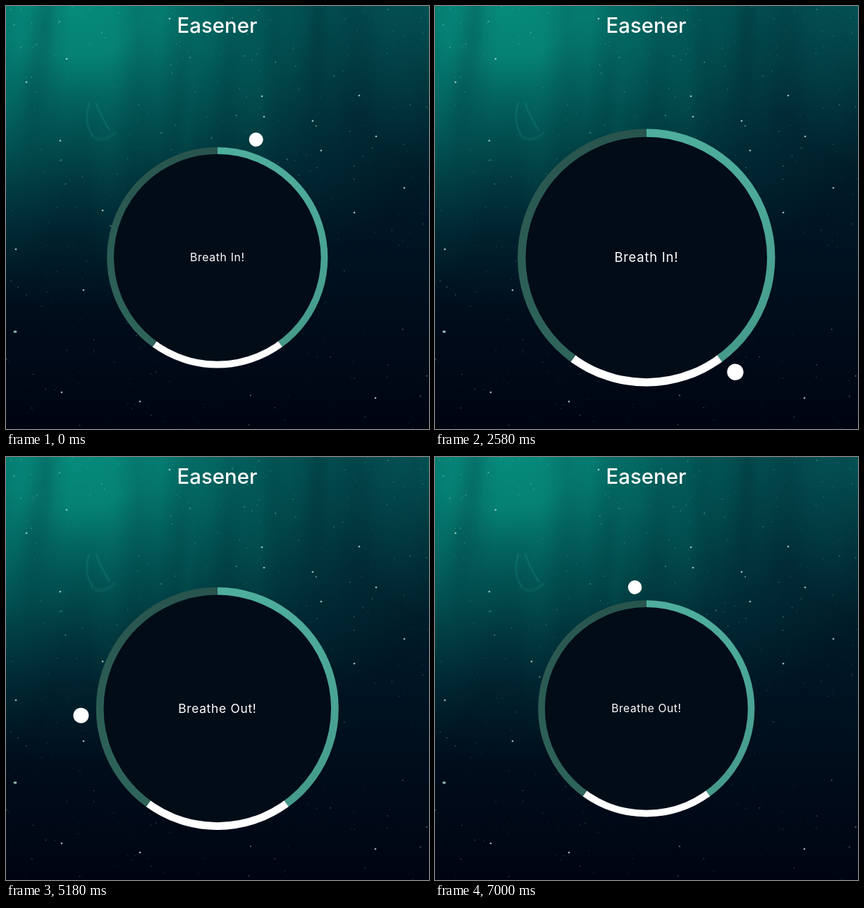
Recreate the animation shown at these times as an HTML page. Size 600 px wide and 600 px high, loop 7.03 s.

```html
<!DOCTYPE html>
<html lang="en">
<head>
<meta charset="utf-8">
<title>Easener</title>
<style>
  html, body { margin: 0; width: 100%; height: 100%; overflow: hidden; background: #000513; }
  svg { display: block; width: 100vw; height: 100vh; }
  text { font-family: Inter, "Open Sans", sans-serif; fill: #fff; text-anchor: middle; }
  #title { font-size: 29.4px; font-weight: 500; }
  #label { font-size: 15.4px; letter-spacing: .04em; }
</style>
</head>
<body>
<svg viewBox="0 0 600 600">
  <defs>
    <linearGradient id="depth" x1="0" y1="0" x2="0" y2="1">
      <stop offset="0" stop-color="#02363e"/>
      <stop offset=".25" stop-color="#01212d"/>
      <stop offset=".5" stop-color="#001524"/>
      <stop offset=".75" stop-color="#000c1a"/>
      <stop offset="1" stop-color="#000411"/>
    </linearGradient>
    <radialGradient id="glow">
      <stop offset="0" stop-color="#068b7b"/>
      <stop offset=".17" stop-color="#068a7a" stop-opacity=".9"/>
      <stop offset=".29" stop-color="#048476" stop-opacity=".68"/>
      <stop offset=".42" stop-color="#028074" stop-opacity=".5"/>
      <stop offset=".58" stop-color="#028074" stop-opacity=".29"/>
      <stop offset=".75" stop-color="#027874" stop-opacity=".14"/>
      <stop offset="1" stop-color="#027874" stop-opacity="0"/>
    </radialGradient>
    <radialGradient id="edgeGlow">
      <stop offset="0" stop-color="#047a72" stop-opacity=".5"/>
      <stop offset=".5" stop-color="#047a72" stop-opacity=".2"/>
      <stop offset="1" stop-color="#047a72" stop-opacity="0"/>
    </radialGradient>
    <radialGradient id="lightRay">
      <stop offset="0" stop-color="#0ca08a" stop-opacity=".07"/>
      <stop offset="1" stop-color="#0ca08a" stop-opacity="0"/>
    </radialGradient>
    <radialGradient id="darkRay">
      <stop offset="0" stop-color="#00202c" stop-opacity=".13"/>
      <stop offset="1" stop-color="#00202c" stop-opacity="0"/>
    </radialGradient>
    <linearGradient id="inhale" x1="0" y1="0" x2="0" y2="1">
      <stop offset="0" stop-color="#4fae9d"/>
      <stop offset="1" stop-color="#459a8a"/>
    </linearGradient>
    <linearGradient id="exhale" x1="0" y1="0" x2="0" y2="1">
      <stop offset="0" stop-color="#28544d"/>
      <stop offset="1" stop-color="#2f655b"/>
    </linearGradient>
  </defs>

  <rect width="600" height="600" fill="url(#depth)"/>
  <ellipse cx="95" cy="0" rx="610" ry="432" fill="url(#glow)"/>
  <ellipse cx="620" cy="-10" rx="170" ry="240" fill="url(#edgeGlow)"/>
  <ellipse cx="-10" cy="90" rx="110" ry="320" fill="url(#edgeGlow)" opacity=".7"/>
  <g id="rays"></g>
  <g fill="none" stroke="#2fa594" stroke-opacity=".16" stroke-linecap="round">
    <path d="M118 138Q110 164 122 182M128 138Q136 160 147 176" stroke-width="3"/>
    <path d="M122 184Q136 196 154 180" stroke-width="5" stroke-opacity=".1"/>
  </g>
  <g id="specks"></g>

  <text id="title" x="299.5" y="38">Easener</text>
  <g id="breather">
    <path id="arcIn" fill="url(#inhale)"/>
    <path id="arcHold" fill="#fff"/>
    <path id="arcOut" fill="url(#exhale)"/>
    <circle r="142.7" fill="#010c17"/>
    <text id="label" y="5.3"></text>
    <circle id="pointer" cy="-171.3" r="9.7" fill="#fff"/>
  </g>
</svg>
<script>
  const LOOP = 7030, TURN = 7490, BREATH = 3000;
  const GROW_START = -435, HOLD_START = 2620, SHRINK_START = 4135;
  const RADIUS = 152.2, GROWTH = 0.2, START_ANGLE = 18.1;

  const $ = id => document.getElementById(id);

  function add(parent, name, attrs) {
    const el = document.createElementNS("http://www.w3.org/2000/svg", name);
    for (const key in attrs) el.setAttribute(key, attrs[key]);
    parent.appendChild(el);
  }

  let seed = 41;
  function random() {
    seed = (seed * 16807) % 2147483647;
    return seed / 2147483647;
  }

  // Wedge of the ring between two fractions of a turn, clockwise from the top.
  function wedge(from, to) {
    const point = f => {
      const a = f * 2 * Math.PI;
      return `${RADIUS * Math.sin(a)} ${-RADIUS * Math.cos(a)}`;
    };
    return `M0 0L${point(from)}A${RADIUS} ${RADIUS} 0 0 1 ${point(to)}Z`;
  }

  function drawWater() {
    for (let i = 0; i < 18; i++) {
      const x = random() * 640 - 20;
      add($("rays"), "ellipse", {
        cx: x, cy: random() * 180, rx: 14 + random() * 26, ry: 130 + random() * 150,
        fill: i % 2 && x < 400 ? "url(#lightRay)" : "url(#darkRay)",
        transform: `rotate(${random() * 6 - 1} ${x} 0)`
      });
    }
    add($("rays"), "ellipse", { cx: 378, cy: 60, rx: 20, ry: 150, fill: "url(#darkRay)" });

    for (let i = 0; i < 620; i++) {
      const y = 600 * random() ** 1.35;
      add($("specks"), "circle", {
        cx: (random() * 600).toFixed(1), cy: y.toFixed(1),
        r: (0.45 + 0.75 * random() ** 3).toFixed(2),
        fill: "#7fc9ba", "fill-opacity": (0.15 + 0.5 * random() ** 2).toFixed(2)
      });
    }
    const bright = [[13, 462], [366, 157], [232, 18], [524, 556], [79, 548], [447, 205],
      [525, 185], [77, 191], [494, 293], [86, 75], [363, 128], [14, 345], [190, 561],
      [137, 290], [565, 258], [29, 108], [435, 163], [501, 127], [110, 403]];
    bright.forEach(([cx, cy], i) => add($("specks"), "ellipse", {
      cx, cy, rx: i ? 1.4 : 2.5, ry: i ? 1.2 : 1.7, fill: "#b5dfd2", "fill-opacity": .8
    }));
  }

  const progress = (t, start) => Math.min(1, Math.max(0, (t - start) / BREATH));

  function render(t) {
    const scale = 1 + GROWTH * (progress(t, GROW_START) - progress(t, SHRINK_START));
    $("breather").setAttribute("transform", `translate(299.8 356.9) scale(${scale})`);
    $("pointer").setAttribute("transform", `rotate(${START_ANGLE + 360 * t / TURN})`);
    const words = t < HOLD_START ? "Breath In!" : t < SHRINK_START ? "Hold" : "Breathe Out!";
    if ($("label").textContent !== words) $("label").textContent = words;
  }

  drawWater();
  $("arcIn").setAttribute("d", wedge(0, 0.4));
  $("arcHold").setAttribute("d", wedge(0.4, 0.6));
  $("arcOut").setAttribute("d", wedge(0.6, 1));

  const start = performance.now();
  function tick() {
    render((performance.now() - start) % LOOP);
    requestAnimationFrame(tick);
  }
  tick();
</script>
</body>
</html>
```
